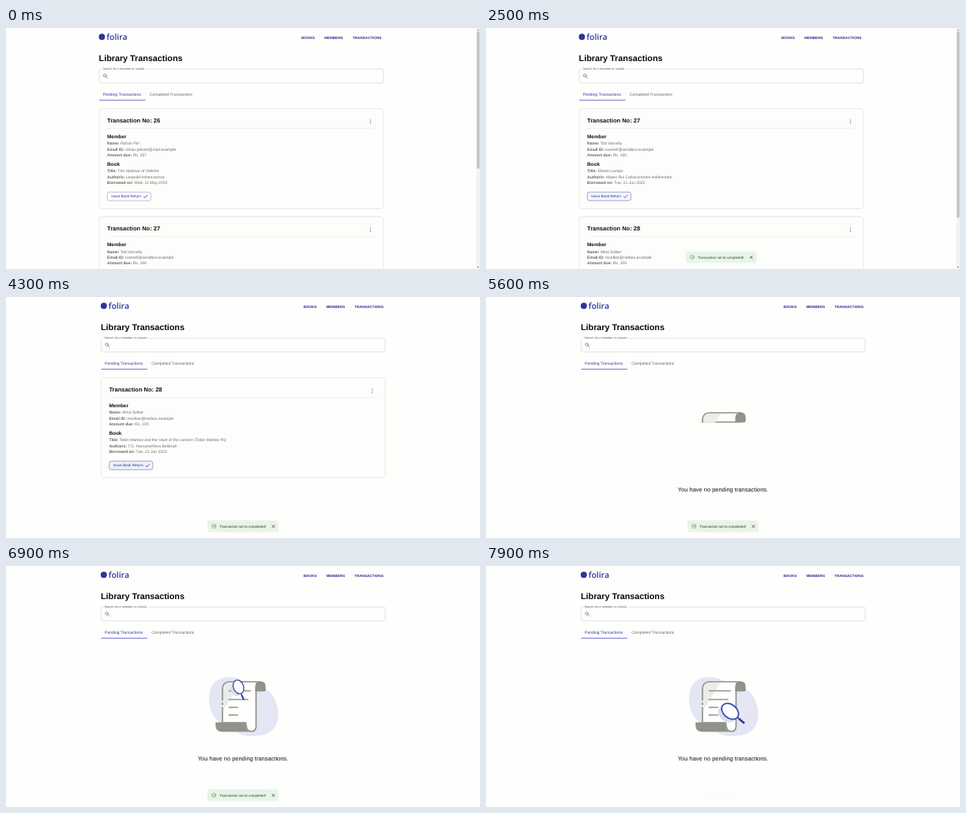
An HTML page for the animation above (8 s loop, 600x306 px).

```html
<!DOCTYPE html>
<html lang="en">
<head>
<meta charset="utf-8">
<title>Library Transactions</title>
<style>
  html, body { margin: 0; width: 100%; height: 100%; overflow: hidden; background: #fefefc; }
  svg { display: block; width: 600px; height: 306px; }
  text { font-family: "Liberation Sans", Arial, sans-serif; text-rendering: geometricPrecision; }
  .bold { font-weight: 700; }
  .brand { font: 600 10.4px "Open Sans", sans-serif; fill: #2f339f; }
  .nav { font-size: 4.62px; fill: #2b2f96; }
  .tab { font-size: 5.02px; }
  .body { font-size: 5.07px; fill: #6e6e6e; }
  .body tspan { font-weight: 700; fill: #626262; }
  .action { font-size: 4.62px; fill: #2f3396; }
  .line { fill: none; stroke-linecap: round; stroke-linejoin: round; }
</style>
</head>
<body>
<svg viewBox="0 0 600 306">
  <rect width="600" height="306" fill="#fefefc"/>
  <g id="page">
    <circle cx="121.4" cy="11.2" r="3.9" fill="#2f339f"/>
    <text class="brand" x="127.3" y="14.8">folira</text>
    <g class="nav bold">
      <text x="374" y="13.6">BOOKS</text>
      <text x="403" y="13.6">MEMBERS</text>
      <text x="438.7" y="13.6">TRANSACTIONS</text>
    </g>
    <text class="bold" x="117.6" y="42" font-size="10.77" fill="#080808">Library Transactions</text>
    <rect x="118" y="52.2" width="359.6" height="17.5" rx="2" fill="none" stroke="#d6d6d4" stroke-width=".7"/>
    <rect x="121" y="51" width="55.5" height="3" fill="#fefefc"/>
    <text x="122.2" y="53.2" font-size="3.83" fill="#5c5c5c">Search for a member or a book</text>
    <g class="line" stroke="#777" stroke-width=".8">
      <circle cx="125.2" cy="60.3" r="1.8"/><path d="M126.6 61.7L128.7 63.8"/>
    </g>
    <text class="tab" x="122.7" y="86.4" fill="#3539a8">Pending Transactions</text>
    <text class="tab" x="181.8" y="86.4" fill="#666">Completed Transactions</text>
    <rect x="118" y="91.4" width="58.5" height=".8" fill="#4448c0"/>
    <g id="cards" transform="translate(0 -.35)"></g>
    <g id="toast">
      <rect x="252.6" y="283.6" width="90" height="14.8" rx="1.5" fill="#e9f4e9"/>
      <g class="line" stroke="#4c9a50" stroke-width=".6">
        <circle cx="260.8" cy="291" r="2.5"/><path d="M259.6 291l1 1l2.2-2.4"/>
      </g>
      <text x="267.8" y="292.7" font-size="4.5" fill="#1e4020">Transaction set to completed!</text>
      <path class="line" d="M334.6 289.7l3 3m0-3l-3 3" stroke="#264a28" stroke-width=".8"/>
    </g>
  </g>
  <g id="scrollbar">
    <rect x="595.3" width="4.7" height="306" fill="#f3f3f1"/>
    <rect id="thumb" x="596" y="4.5" width="3.4" fill="#c3c3c1"/>
    <path d="M596.4 3l1.3-1.6l1.3 1.6zM596.4 303l1.3 1.6l1.3-1.6z" fill="#666"/>
  </g>
  <g id="empty">
    <text x="300" y="247.3" text-anchor="middle" font-size="7.48" fill="#111">You have no pending transactions.</text>
    <path id="blob" fill="#e5e6f3" d="M257 168C257 150 268 141 283 141C300 141 304 151 320 153C337 156 345 173 344.5 190C344 207 332 216 312 216C294 216 288 208 276 202C263 196 257 183 257 168Z"/>
    <g id="scroll" stroke-width="1.7">
      <path id="sheet" fill="#fefefc" stroke="#8f9389"/>
      <path id="gloss" fill="#ececea"/>
      <path d="M315.5 159.3V153Q316 146.4 322.5 146.4Q328.7 146.4 328.7 153V157.5Q328.7 159.3 327 159.3Z" fill="#8f9389"/>
      <path id="roll" d="M265.3 198.5H303.5V204Q304 210 310 210.4H273Q265.3 210 265.3 203Z" fill="#8f9389"/>
      <path id="nicks" d="M274 171v2m0 4v2" stroke="#fefefc" stroke-width="2.4"/>
      <g id="lines" fill="#8f9389"></g>
    </g>
    <g id="lens">
      <ellipse id="shade" rx="12" ry="8.5" fill="#d5dcf2"/>
      <g id="glass">
        <path class="line" d="M12 0H15" stroke="#3a46b0" stroke-width="1.6"/>
        <path class="line" d="M15.5 0H22.5" stroke="#2f3f9f" stroke-width="2.8"/>
        <ellipse rx="12" ry="8.5" fill="#fff" stroke="#3a46b0" stroke-width="1.7"/>
      </g>
    </g>
  </g>
</svg>
<script>
const LOOP = 8000, STEP = 100;
const $ = id => document.getElementById(id);
const set = (id, attrs) => {
  for (const key in attrs) $(id).setAttribute(key, attrs[key]);
};
const show = (id, on) => set(id, { visibility: on ? 'visible' : 'hidden' });
const mix = (a, b, p) => a + (b - a) * p;
const span = (t, from, to) => Math.min(1, Math.max(0, (t - from) / (to - from)));
const ease = p => p * p * (3 - 2 * p);
const scaleAt = (x, y, sx, sy = sx) => `translate(${x} ${y}) scale(${sx} ${sy}) translate(${-x} ${-y})`;

const loans = [
  { no: 26, name: 'Rohan Pel', email: 'rohan.pelvari@mail.example', due: 257,
    title: 'The Harbour of Velmire', author: 'Leopold Ashenvarrow', date: 'Wed, 11 May 2022' },
  { no: 27, name: 'Tob Varnelly', email: 'tvarnell@sendbox.example', due: 100,
    title: 'Eleven Lamps', author: 'Mateo Rui Calvora/Anton Hollenmark', date: 'Tue, 21 Jun 2022' },
  { no: 28, name: 'Mina Solker', email: 'msolker@netbox.example', due: 100,
    title: 'Tobin Marlow and the Vault of the Lantern (Tobin Marlow #5)',
    author: 'T.D. Harvane/Nora Bellerué', date: 'Tue, 21 Jun 2022' }
];

const row = (y, label, value) =>
  `<text class="body" x="128" y="${y}"><tspan>${label}:</tspan> ${value}</text>`;
const heading = (y, size, label) =>
  `<text class="bold" x="128" y="${y}" font-size="${size}" fill="#121212">${label}</text>`;

function card(loan, slot) {
  const hot = slot === 0 ? ' id="button"' : '';
  return `<g transform="translate(0 ${slot * 137.2})">
    <rect x="118" y="102.6" width="359.6" height="127.2" rx="3.3" fill="#fdfdfb" stroke="#e0e0de" stroke-width=".7"/>
    ${heading(120.5, 7.5, 'Transaction No: ' + loan.no)}
    <path d="M461.3 117.1v.01m0 2.2v.01m0 2.2v.01" class="line" stroke="#666" stroke-width="1.2"/>
    <path d="M128 128H467" stroke="#e4e4e2" stroke-width=".6"/>
    ${heading(140.5, 6.4, 'Member')}
    ${row(148.7, 'Name', loan.name)}
    ${row(156.1, 'Email ID', loan.email)}
    ${row(163.5, 'Amount due', 'Rs. ' + loan.due)}
    ${heading(175.6, 6.4, 'Book')}
    ${row(183.7, 'Title', loan.title)}
    ${row(191.1, 'Author/s', loan.author)}
    ${row(198.6, 'Borrowed on', loan.date)}
    <rect${hot} x="128.2" y="208.7" width="55.2" height="10.9" rx="2.6" fill="#fdfdfb" stroke="#a8abd8" stroke-width=".7"/>
    <text class="action" x="133.2" y="215.8">Issue Book Return</text>
    <path class="line" d="M174.4 214.4l1.5 1.5l3.2-3.4" stroke="#2f3396" stroke-width=".8"/>
  </g>`;
}

let shownCards = '';
function drawCards(t) {
  const first = t < 2200 ? 0 : t < 3400 ? 1 : t < 5300 ? 2 : 3;
  const markup = loans.slice(first, first + 2).map(card).join('');
  if (markup !== shownCards) $('cards').innerHTML = shownCards = markup;
  if (first > 2) return;
  const hover = span(t, 700, 1100);
  const pressed = (t >= 1900 && t < 2200) || (t >= 2900 && t < 3400) || t >= 4300;
  const tint = pressed ? [239, 241, 250] : [244, 245, 251];
  const blend = (from, to) => `rgb(${from.map((c, i) => Math.round(mix(c, to[i], hover)))})`;
  set('button', {
    fill: blend([253, 253, 251], tint),
    stroke: blend([168, 171, 216], [126, 131, 200])
  });
}

function drawToast(t) {
  const enter = ease(span(t, 2100, 2550));
  const leave = ease(span(t, 7600, 7930));
  const visible = enter * (1 - leave);
  const size = mix(.75, 1, visible);
  set('toast', { opacity: visible, transform: scaleAt(297.6, 291, size, size * size) });
}

// Each line: y, right end, start delay.
const textLines = [[158.5, 310, 0], [169.4, 307, 100], [179.5, 294, 200], [189.2, 294, 300]];

function sheetPath(bottom) {
  const round = Math.min(10, bottom - 147);
  const top = `V${147 + round}Q274 147 284 147H322`;
  if (bottom < 160) return `M274 ${bottom}${top}V${bottom}Z`;
  const side = `${top}Q316.5 147 316.5 153`;
  if (bottom < 205) return `M274 ${bottom}${side}V${bottom}Z`;
  return `M274 199${side}V${bottom - 6}Q316.5 ${bottom} 310 ${bottom}Q304 ${bottom} 303.5 199Z`;
}

function drawScroll(t) {
  show('scroll', t >= 5500);
  const bottom = mix(148, 210, ease(span(t, 5420, 6100)));
  set('sheet', { d: sheetPath(bottom) });
  // The sheen reaches over the lower edge until the sheet is unrolled.
  const low = Math.min(bottom + 1, 183);
  const edge = mix(297, 275, (low - 148) / 35);
  set('gloss', { d: `M275 ${low}V155Q275.5 148 284 148H297L${edge} ${low}Z` });
  show('roll', bottom >= 205);
  show('nicks', bottom > 181);
  const grow = ease(span(t, 5600, 6100));
  set('blob', { transform: scaleAt(300, 180, grow) });
  $('lines').innerHTML = textLines.map(([y, end, delay]) => {
    const width = (end - 281.5) * ease(span(t, 6100 + delay, 6400 + delay));
    return `<rect x="281.5" y="${y - .75}" width="${width}" height="1.5" rx=".7"/>`;
  }).join('');
}

function drawLens(t) {
  const appear = ease(span(t, 6400, 6850));
  const sweep = ease(span(t, 7000, 7900));
  const x = mix(294.3, 309, sweep) + 5 * Math.sin(Math.PI * sweep);
  const y = mix(153.5, 184.5, sweep);
  const size = mix(.75, 1, sweep) * appear;
  const pose = `rotate(${mix(68, 40, sweep)}) scale(${size})`;
  set('glass', { transform: `translate(${x} ${y}) ${pose}` });
  set('shade', { transform: `translate(${x - 4.5 * size} ${y + 4 * size}) ${pose}` });
}

function draw(t) {
  const scrolls = t < 3400;
  set('page', { transform: `translate(${scrolls ? 0 : 2.4} 0)` });
  show('scrollbar', scrolls);
  set('thumb', { height: t < 2200 ? 174 : 236 });
  drawCards(t);
  drawToast(t);
  const empty = t >= 5300;
  set('empty', { display: empty ? 'inline' : 'none' });
  if (empty) {
    drawScroll(t);
    drawLens(t);
  }
}

const start = performance.now();
function tick() {
  const t = (performance.now() - start) % LOOP;
  draw(Math.floor(t / STEP) * STEP);
  requestAnimationFrame(tick);
}
tick();
</script>
</body>
</html>
```
